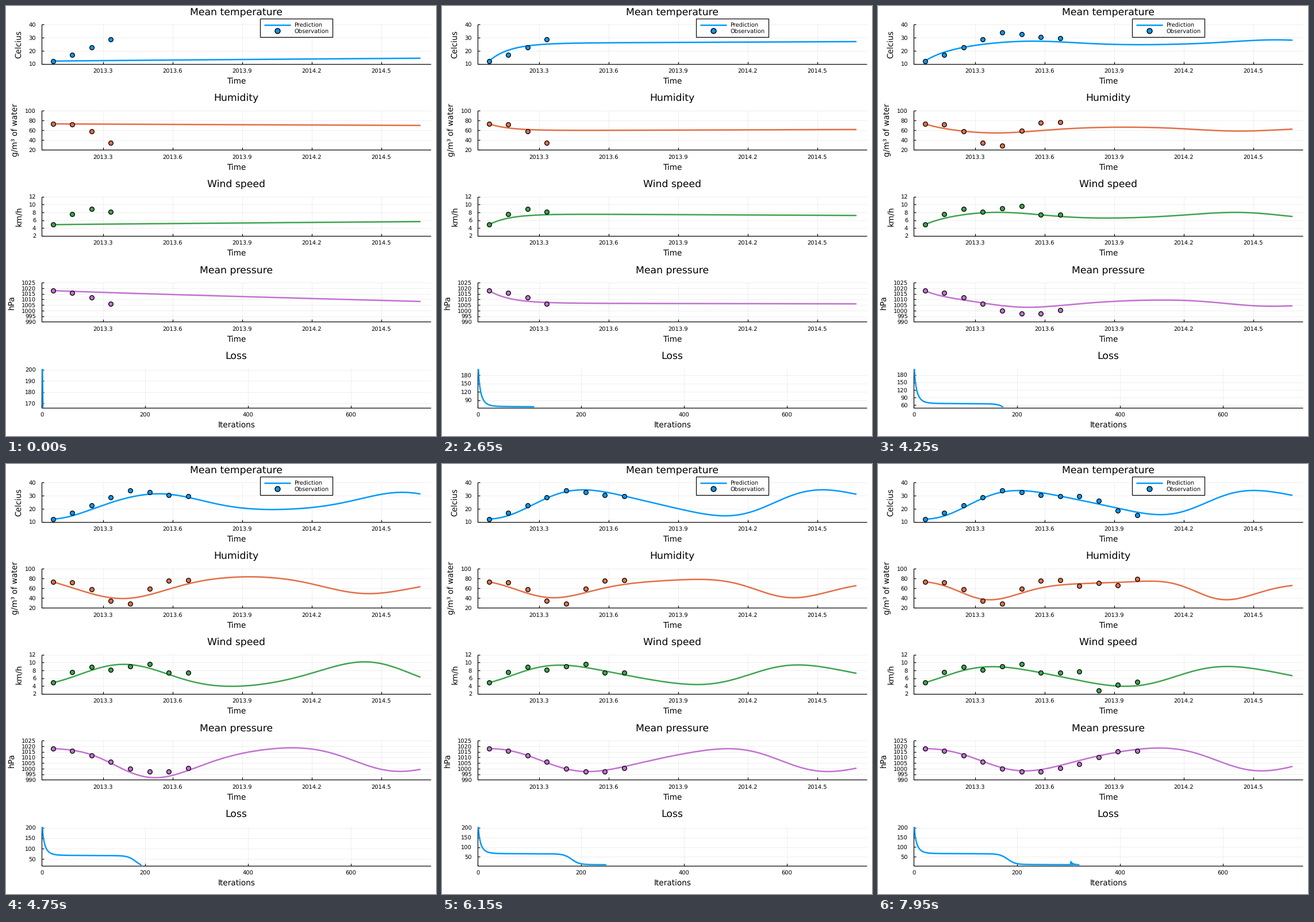
A matplotlib script that plays this animation: 748 by 748 pixels, repeating every 8 s.

```python
import numpy as np
import matplotlib.pyplot as plt
from matplotlib.animation import FuncAnimation
from matplotlib.collections import LineCollection
from matplotlib.patches import Rectangle

SIZE = 748
FRAMES, INTERVAL = 160, 50
LEFT, RIGHT, TOP, HEIGHT, PITCH = 62.0, 738.4, 31.9, 68.2, 149.6
T0, T1 = 2013 + 1 / 12, 2014 + 2 / 3
MARGIN = 0.03 * (T1 - T0)
TITLE, GUIDE, TICK = 17.3, 13.6, 9.9
BLUE = "#009afa"

plt.rcParams.update({"font.family": "DejaVu Sans", "text.hinting": "none"})
fig = plt.figure(figsize=(SIZE / 72, SIZE / 72), dpi=72, facecolor="white")
ax = fig.add_axes([0, 0, 1, 1])
# Whole numbers stand for pixel centres
ax.set_xlim(-0.5, SIZE - 0.5)
ax.set_ylim(SIZE - 0.5, -0.5)
ax.axis("off")


def year_x(t):
    lo, hi = T0 - MARGIN, T1 + MARGIN
    return LEFT + (t - lo) / (hi - lo) * (RIGHT - LEFT)


def iter_x(n):
    return LEFT + n * 0.8958


def value_y(v, row, lo, hi):
    return TOP + row * PITCH + HEIGHT * (hi - np.asarray(v)) / (hi - lo)


def text(x, y, s, size, ha="center", **kw):
    return ax.text(x, y, s, fontsize=size, ha=ha, va="baseline", **kw)


def line_set(width, alpha, z):
    lines = LineCollection([], colors=[(0, 0, 0, alpha)], linewidths=width, zorder=z)
    ax.add_collection(lines)
    return lines


def grid_set():
    return line_set(0.6, 0.1, 1)


def tick_set():
    return line_set(1.2, 1, 3)


def curve(color):
    return ax.plot([], [], color=color, lw=2.5, zorder=4,
                   solid_capstyle="projecting", solid_joinstyle="round")[0]


def set_y_marks(grid, ticks, ys):
    grid.set_segments([[(LEFT, y), (RIGHT, y)] for y in ys])
    ticks.set_segments([[(LEFT, y), (LEFT + 4, y)] for y in ys])


def frame_panel(row, title, guide, xs, x_names):
    """Draw titles, axis lines, vertical grid and x tick labels."""
    top = TOP + row * PITCH
    base = top + HEIGHT
    text(400.2, top - 16.6, title, TITLE)
    text(400.2, base + 34.1, guide, GUIDE)
    grid_set().set_segments([[(x, top), (x, base)] for x in xs])
    marks = [[(x, base), (x, base - 4)] for x in xs]
    marks += [[(LEFT, top), (LEFT, base)], [(LEFT, base), (RIGHT, base)]]
    tick_set().set_segments(marks)
    for x, name in zip(xs, x_names):
        text(x, base + 15.3, name, TICK)


U = np.linspace(0, T1 - T0, 240)
CURVE_X = year_x(T0 + U)


def settle(start, slope, rise):
    """Quick approach to a slowly drifting level."""
    return start + slope * U + rise * (1 - np.exp(-U / 0.09))


def wave(start, period, mid, amp, peak, skew, sharp, damp=0):
    """Yearly wave with uneven flanks, pulled to the first observation."""
    a = 2 * np.pi * (U - peak) / period
    phase = a + skew * (1 - np.cos(a)) + sharp * np.sin(a)
    v = mid + amp * np.exp(-damp * U) * np.cos(phase)
    return v + (start - v[0]) * np.exp(-(U / 0.2) ** 2)


PERIODS = (1.055, 1.035, 1.02)
# rise: change of the first straight fit over the whole span
# settle: slope and rise; waves: arguments of wave() from mid onwards
PANELS = [
    dict(title="Mean temperature", guide="Celcius", guide_x=26,
         lo=10, hi=40, step=10, color=BLUE,
         obs=[12.1, 16.9, 22.8, 28.9, 33.8, 32.5, 30.7, 29.6, 29.8, 26.1, 18.8, 15.2],
         rise=2.2, settle=[(0.55, 14.1), (0.85, 13.55)],
         waves=[(25.7, 5.4, 0.45, 0.08, 0.3, -0.16),
                (24.55, 9.95, 0.405, -0.29, 0.1),
                (24.75, 9.25, 0.4, -0.34, 0.08)]),
    dict(title="Humidity", guide="g/m³ of water", guide_x=19.7,
         lo=20, hi=100, step=20, color="#e36f47",
         obs=[73, 72.1, 57.5, 34.7, 29, 58.8, 75, 76.8, 64.7, 70.1, 66.2, 79.1],
         rise=-3.2, settle=[(-1, -12.2), (2.1, -14.4)],
         waves=[(64.2, -28.1, 0.317, -0.06, 0.27, 0.448),
                (59.3, -18.7, 0.28, -0.2, 0.47),
                (55.5, -19, 0.282, -0.3, 0.75)]),
    dict(title="Wind speed", guide="km/h", guide_x=26,
         lo=2, hi=12, step=2, color="#3ea44e",
         obs=[4.85, 7.48, 8.8, 8.07, 8.95, 9.6, 7.38, 7.4, 7.63, 2.85, 4.26, 4.98],
         rise=0.78, settle=[(-0.03, 2.57), (-0.32, 2.82)],
         waves=[(6.9, 2.66, 0.287, 0.12, 0.21, -0.15),
                (6.87, 2.5, 0.3, -0.23, 0.12),
                (6.45, 2.53, 0.285, -0.22, 0.03)]),
    dict(title="Mean pressure", guide="hPa", guide_x=13.4,
         lo=990, hi=1025, step=5, color="#c371d2",
         obs=[1017.9, 1016, 1011.8, 1006.3, 999.9, 997.3,
              997.4, 1000.4, 1004, 1010, 1015.4, 1016.1],
         rise=-9.7, settle=[(0.85, -12.8), (-0.6, -10.95)],
         waves=[(1007, -18.3, 0.451, -0.17, 0.25, 0.44),
                (1007.6, -10.2, 0.428, -0.24, 0.15),
                (1008.2, -10.2, 0.433, -0.18, 0.2)]),
]


def loss_at(n):
    """Fast decay, a plateau, a second drop and a ringing restart."""
    decay = 133 * np.exp(-0.286 * (n - 1) ** 0.79)
    drop = 55 / (1 + np.exp((n - 182) / 7.5))
    m = np.maximum(n - 305, 0)
    ring = 16 * np.exp(-m / 4) * np.cos(1.6 * m) ** 2
    return 12 - 0.01 * n + decay + drop + np.where(n >= 305, ring, 0)


ITERS = np.arange(1, 2 * FRAMES + 1)
LOSS = loss_at(ITERS)

# Weather panels
years = [2013.3, 2013.6, 2013.9, 2014.2, 2014.5]
obs_x = year_x(T0 + np.arange(12) / 12)
for row, p in enumerate(PANELS):
    lo, hi, start = p["lo"], p["hi"], p["obs"][0]
    frame_panel(row, p["title"], "Time", [year_x(t) for t in years], years)
    values = range(lo, hi + 1, p["step"])
    ys = value_y(values, row, lo, hi)
    set_y_marks(grid_set(), tick_set(), ys)
    for v, y in zip(values, ys):
        text(51.6, y + 3.6, v, TICK, ha="right")
    text(p["guide_x"], TOP + row * PITCH + HEIGHT / 2, p["guide"], GUIDE,
         rotation=90, rotation_mode="anchor")
    fits = [start + p["rise"] * (U / U[-1]) ** 0.9]
    fits += [settle(start, *s) for s in p["settle"]]
    fits += [wave(start, period, *w) for period, w in zip(PERIODS, p["waves"])]
    p["keys"] = [value_y(fit, row, lo, hi) for fit in fits]
    p["line"] = curve(p["color"])
    p["dots"], = ax.plot([], [], "o", ms=7.7, mfc=p["color"], mec="black",
                         mew=1.3, zorder=5)
    p["obs_y"] = value_y(p["obs"], row, lo, hi)

# Loss panel
counts = range(0, 601, 200)
frame_panel(4, "Loss", "Iterations", [iter_x(c) for c in counts], counts)
loss_line = curve(BLUE)
loss_grid, loss_ticks = grid_set(), tick_set()
loss_names = [text(51.6, 0, "", TICK, ha="right") for _ in range(5)]

# Legend
ax.add_patch(Rectangle((441.5, 21.2), 126, 32.2, fc="white", ec="black", lw=1.2, zorder=6))
ax.plot([449, 494.5], [32, 32], color=BLUE, lw=2.5, solid_capstyle="butt", zorder=7)
ax.plot([471.5], [42.9], "o", ms=8.8, mfc=BLUE, mec="black", mew=1.5, zorder=7)
text(500.8, 35.6, "Prediction", TICK, ha="left", zorder=7)
text(500.8, 46.5, "Observation", TICK, ha="left", zorder=7)

STAGES = [0, 21, 74, 95, 123, 159]


def pose(f):
    """Return the index of the running stage and how far it has come."""
    k = min(int(np.searchsorted(STAGES, f, side="right")) - 1, len(STAGES) - 2)
    a, b = STAGES[k], STAGES[k + 1]
    s = (f - a) / (b - a)
    now, first, last = (LOSS[2 * i + 1] for i in (f, a, b))
    if k == 0:
        return k, 1 - np.sqrt((now - last) / (first - last))
    if k == 1:
        return k, 1 - (1 - s) ** 2
    if k == 2:
        return k, (first - now) / (first - last)
    if k == 3:
        return k, 1 - np.exp(-2.2 * s) * np.cos(6 * s) * (1 - s)
    kick = 1.5 * np.exp(-((f - 152.5) / 1.8) ** 2)
    return k, np.interp(f, [a, 150, b], [0, 0.5, 1]) - kick


def draw_loss(n):
    lo, hi = LOSS[:n].min(), LOSS[:n].max()
    pad = 0.03 * (hi - lo)
    lo, hi = lo - pad, hi + pad
    loss_line.set_data(iter_x(ITERS[:n]), value_y(LOSS[:n], 4, lo, hi))
    for step in (10, 20, 25, 30, 50):
        values = np.arange(np.ceil(lo / step) * step, hi, step)
        if len(values) <= 5:
            break
    ys = value_y(values, 4, lo, hi)
    set_y_marks(loss_grid, loss_ticks, ys)
    for i, name in enumerate(loss_names):
        shown = i < len(values)
        name.set_visible(shown)
        if shown:
            name.set_text(f"{values[i]:.0f}")
            name.set_y(ys[i] + 3.6)


def draw(f):
    k, w = pose(f)
    seen = 4 * (1 + f // 75)
    for p in PANELS:
        a, b = p["keys"][k:k + 2]
        p["line"].set_data(CURVE_X, a + (b - a) * w)
        p["dots"].set_data(obs_x[:seen], p["obs_y"][:seen])
    draw_loss(2 * f + 2)
    return []


anim = FuncAnimation(fig, draw, frames=FRAMES, interval=INTERVAL,
                     init_func=lambda: draw(0), repeat=True, repeat_delay=0)
plt.show()
```
